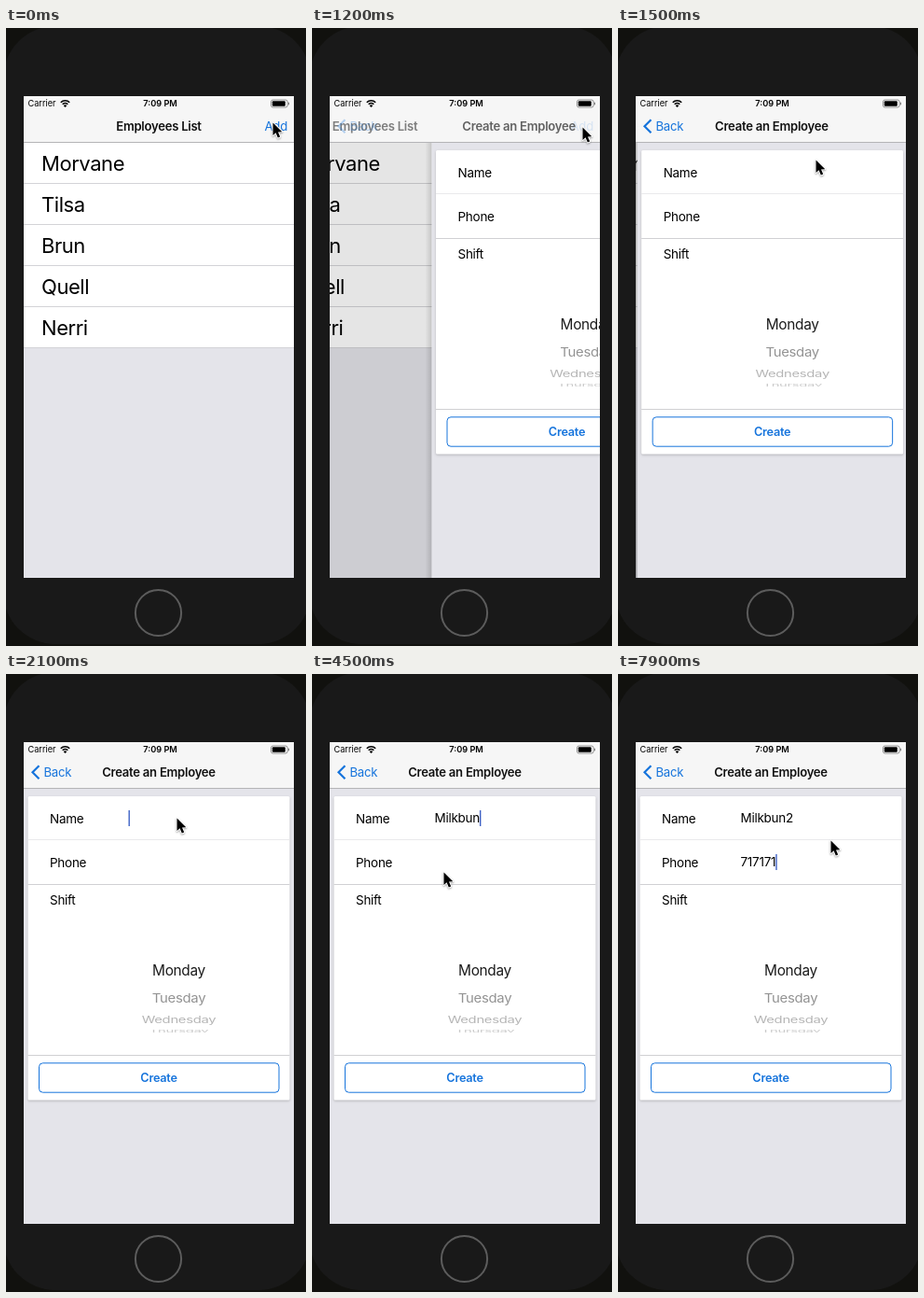
Animation of 322x662 px, one loop 8000 ms. Source, as an HTML page with a canvas:

```html
<!DOCTYPE html>
<html lang="en">
<head>
<meta charset="utf-8">
<title>Employee form</title>
<style>
html, body { margin: 0; width: 100%; height: 100%; overflow: hidden; background: #191919; }
canvas { display: block; width: 322px; height: 662px; }
</style>
</head>
<body>
<canvas id="stage"></canvas>
<script>
const W = 322, H = 662, LOOP = 8000, STEP = 100;
const SCREEN = { x: 19, y: 73, w: 290, h: 516 };
const BLUE = '#1674dc', GREY = '#e4e4ea';
const PEOPLE = ['Morvane', 'Tilsa', 'Brun', 'Quell', 'Nerri'];
const NAME = 'Milkbun2', PHONE = '717171';
const NAME_TIMES = [2600, 2800, 3000, 3300, 3600, 3900, 4200, 5400];
const PHONE_TIMES = [7100, 7200, 7400, 7500, 7700, 7800];
const PHONE_FOCUS = 6700;

// Pointer path: time, x, y
const POINTER = [
  [0, 286, 101], [100, 291, 94], [200, 299, 103], [300, 296, 108], [400, 290, 106],
  [1200, 290, 106], [1300, 263, 116], [1500, 212, 141], [1800, 183, 154],
  [2300, 183, 154], [2900, 141, 212], [5200, 141, 212], [5800, 158, 202],
  [7100, 158, 202], [7500, 236, 192], [7900, 228, 178]
];

const canvas = document.getElementById('stage');
const ctx = canvas.getContext('2d');
const dpr = window.devicePixelRatio || 1;
canvas.width = W * dpr;
canvas.height = H * dpr;

const clamp = v => Math.max(0, Math.min(1, v));

function rect(x, y, w, h, fill) {
  ctx.fillStyle = fill;
  ctx.fillRect(x, y, w, h);
}

function rounded(x, y, w, h, r) {
  ctx.beginPath();
  ctx.roundRect(x, y, w, h, r);
}

function setFont(size, weight = 400, tracking = -0.02) {
  ctx.font = `${weight} ${size}px Inter, "Open Sans", sans-serif`;
  ctx.letterSpacing = size * tracking + 'px';
}

function label(str, x, y, { size = 13.5, weight = 400, color = '#000', align = 'left', tracking, alpha = 1 } = {}) {
  setFont(size, weight, tracking);
  ctx.globalAlpha = alpha;
  ctx.textAlign = align;
  ctx.fillStyle = color;
  ctx.fillText(str, x, y);
  ctx.globalAlpha = 1;
}

function clipTo(x, y, w, h) {
  ctx.beginPath();
  ctx.rect(x, y, w, h);
  ctx.clip();
}

function drawPhone() {
  rect(0, 0, W, H, '#11110e');
  rounded(-3, -2, 330, 662, 56);
  ctx.fillStyle = '#191919';
  ctx.fill();
  ctx.beginPath();
  ctx.arc(163.5, 626.5, 24.6, 0, Math.PI * 2);
  ctx.strokeStyle = '#5c5c5c';
  ctx.lineWidth = 2;
  ctx.stroke();
}

function drawStatus() {
  label('Carrier', 23.5, 84, { size: 9.2, tracking: 0 });
  label('7:09 PM', 165.5, 84, { size: 9.2, weight: 600, tracking: 0, align: 'center' });

  ctx.strokeStyle = '#000';
  ctx.lineWidth = 1.6;
  for (const r of [3.9, 6.7]) {
    ctx.beginPath();
    ctx.arc(63.5, 84.5, r, -Math.PI * 0.75, -Math.PI * 0.25);
    ctx.stroke();
  }
  ctx.beginPath();
  ctx.moveTo(63.5, 85);
  ctx.arc(63.5, 85, 2.5, -Math.PI * 0.75, -Math.PI * 0.25);
  ctx.fillStyle = '#000';
  ctx.fill();

  rounded(284.5, 77, 17.6, 8, 2);
  ctx.strokeStyle = '#777';
  ctx.lineWidth = 0.8;
  ctx.stroke();
  rounded(285.8, 78.3, 14, 5.4, 1);
  ctx.fill();
  rect(303, 79.7, 1, 2.6, '#777');
}

function drawNav(t, p) {
  rect(19, 73, 290, 49, '#f6f6f6');
  rect(19, 122, 290, 1, '#b4b4b7');
  drawStatus();

  const bold = { size: 13.1, weight: 600, align: 'center', color: '#111' };
  const oldAlpha = t < 1200 ? 1 : clamp((1 - p) * 1.4);
  label('Employees List', 164 - 155 * p, 110, { ...bold, alpha: oldAlpha });

  let addAlpha = 1;
  if (t >= 900) addAlpha = 0.5;
  if (t >= 1000) addAlpha = 0.2;
  if (t >= 1200) addAlpha = 0.14;
  if (t >= 1400) addAlpha = 0;
  label('Add', 277.5, 110, { size: 13.2, color: BLUE, alpha: addAlpha });

  if (t < 1200) return;
  label('Create an Employee', 164 + 154 * (1 - p), 110, { ...bold, alpha: clamp(p * 1.2 - 0.1) });
  const backAlpha = clamp((p - 0.5) * 2.4);
  ctx.globalAlpha = backAlpha;
  ctx.strokeStyle = BLUE;
  ctx.lineWidth = 2.2;
  ctx.beginPath();
  ctx.moveTo(35.5, 98.3);
  ctx.lineTo(28.5, 105.3);
  ctx.lineTo(35.5, 112.3);
  ctx.stroke();
  label('Back', 40.5, 110, { size: 13.2, color: BLUE, alpha: backAlpha });
}

function drawList(p) {
  const dx = -87 * p;
  rect(19, 123, 290, 220, '#fff');
  PEOPLE.forEach((name, i) => {
    const y = 123 + 44 * i;
    label(name, 38 + dx, y + 30, { size: 22 });
    rect(19, y + 43, 290, 1, '#d3d3d7');
  });
  rect(19, 123, 290, 466, `rgba(0,0,0,${0.165 * p})`);
}

function drawPicker() {
  // text, baseline, size, vertical foreshortening, colour
  const days = [
    ['Monday', 323, 15.4, 1, '#1c1c1c'],
    ['Tuesday', 352, 14.9, 0.88, '#929292'],
    ['Wednesday', 374, 14.8, 0.66, '#b5b5b5'],
    ['Thursday', 384, 14.8, 0.32, '#cbcbcb']
  ];
  for (const [day, y, size, squash, color] of days) {
    ctx.save();
    if (day === 'Thursday') clipTo(120, 381, 130, 3);
    ctx.translate(185.5, y);
    ctx.scale(1, squash);
    label(day, 0, 0, { size, color, align: 'center' });
    ctx.restore();
  }
}

function drawField(str, y, focused) {
  label(str, 131.5, y);
  if (!focused) return;
  setFont(13.5);
  rect(131.5 + ctx.measureText(str).width, y - 13, 1.4, 17, '#3f62c6');
}

function typed(str, times, t) {
  return str.slice(0, times.filter(at => at <= t).length);
}

function drawForm(t, offset) {
  ctx.save();
  ctx.translate(offset, 0);
  if (offset > 0) {
    const shade = ctx.createLinearGradient(12, 0, 19, 0);
    shade.addColorStop(0, 'rgba(0,0,0,0)');
    shade.addColorStop(1, 'rgba(0,0,0,0.14)');
    rect(12, 123, 7, 466, shade);
  }
  rect(19, 123, 290, 466, GREY);

  ctx.save();
  ctx.shadowColor = 'rgba(0,0,0,0.22)';
  ctx.shadowBlur = 2.5 * dpr;
  ctx.shadowOffsetY = dpr;
  rounded(23.5, 131, 281, 325.5, 1.5);
  ctx.fillStyle = '#fff';
  ctx.fill();
  ctx.restore();

  rect(23.5, 177, 281, 1, '#e9e9eb');
  rect(23.5, 225, 281, 1, '#d0d0d3');
  rect(23.5, 408, 281, 1, '#d0d0d3');
  label('Name', 47, 160);
  label('Phone', 47, 207);
  label('Shift', 47, 247);

  const onPhone = t >= PHONE_FOCUS;
  drawField(typed(NAME, NAME_TIMES, t), 159, t >= 2000 && !onPhone);
  drawField(typed(PHONE, PHONE_TIMES, t), 206, onPhone);
  drawPicker();

  rounded(35.5, 416.8, 257.5, 31.4, 4);
  ctx.strokeStyle = BLUE;
  ctx.lineWidth = 1;
  ctx.stroke();
  label('Create', 164, 437, { size: 12.7, weight: 600, color: BLUE, align: 'center' });
  ctx.restore();
}

function pointerAt(t) {
  const i = POINTER.findIndex(k => k[0] > t);
  if (i < 0) return POINTER[POINTER.length - 1].slice(1);
  const [t0, x0, y0] = POINTER[i - 1], [t1, x1, y1] = POINTER[i];
  const k = (t - t0) / (t1 - t0);
  return [x0 + (x1 - x0) * k, y0 + (y1 - y0) * k];
}

function drawPointer(t) {
  const [x, y] = pointerAt(t);
  const tip = [[0.5, 0.5], [0.5, 14], [3.6, 11.2], [5.8, 16.6], [8.2, 15.6], [6, 10.4], [10.3, 10.2]];
  ctx.save();
  ctx.translate(x, y);
  ctx.beginPath();
  tip.forEach(([px, py]) => ctx.lineTo(px, py));
  ctx.closePath();
  ctx.lineJoin = 'round';
  ctx.lineWidth = 1.8;
  ctx.strokeStyle = '#fff';
  ctx.shadowColor = 'rgba(0,0,0,0.35)';
  ctx.shadowBlur = 2 * dpr;
  ctx.shadowOffsetY = dpr;
  ctx.stroke();
  ctx.shadowColor = 'transparent';
  ctx.fillStyle = '#000';
  ctx.fill();
  ctx.restore();
}

// Remaining slide distance of the pushed view
function slideOffset(t) {
  if (t < 1200) return SCREEN.w;
  const left = 109.5 * Math.pow(0.247, (t - 1200) / 100);
  return left < 0.3 ? 0 : left;
}

function draw(t) {
  const offset = slideOffset(t);
  const p = 1 - offset / SCREEN.w;
  ctx.setTransform(dpr, 0, 0, dpr, 0, 0);
  drawPhone();
  ctx.save();
  clipTo(SCREEN.x, SCREEN.y, SCREEN.w, SCREEN.h);
  rect(SCREEN.x, SCREEN.y, SCREEN.w, SCREEN.h, GREY);
  if (offset > 0) drawList(p);
  if (t >= 1200) drawForm(t, offset);
  drawNav(t, p);
  ctx.restore();
  drawPointer(t);
}

const start = performance.now();
function tick() {
  const t = (performance.now() - start) % LOOP;
  draw(Math.floor(t / STEP) * STEP);
  requestAnimationFrame(tick);
}
tick();
</script>
</body>
</html>
```
